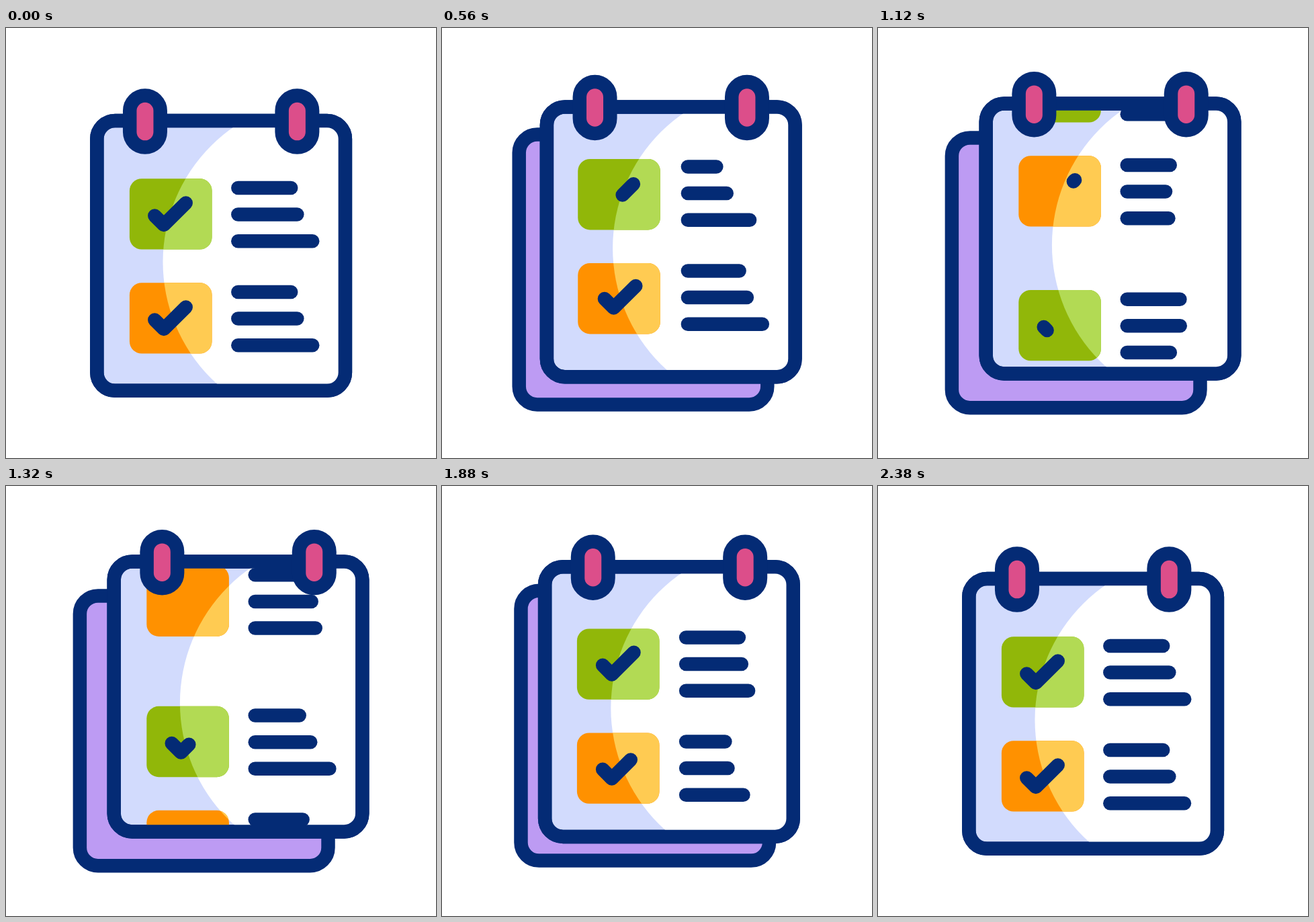
Recreate the animation shown at these times as an HTML page with a canvas. Size 640 px wide and 640 px high, loop 2400 ms.

```html
<!DOCTYPE html>
<html lang="en">
<head>
<meta charset="utf-8">
<title>Checklist pad</title>
<style>
  html, body { margin: 0; height: 100%; overflow: hidden; background: #fff; }
  canvas { display: block; width: 100vw; height: 100vh; }
</style>
</head>
<body>
<canvas id="stage" width="640" height="640"></canvas>
<script>
const ctx = document.getElementById('stage').getContext('2d');
const LOOP = 2400, SHIFT = 25.4, ROW = 155;
const NAVY = '#042b75', SHADE = '#d2dbfd', PURPLE = '#bd9bf3', PINK = '#dc4e8a';
const GREEN = ['#91b709', '#b2da54'], ORANGE = ['#ff9100', '#ffcb52'];
const CHECK = [[221.3, 279.4], [234.9, 293], [267.7, 260.4]];
const LINE_ENDS = [424.2, 433.3, 456.2];

// row: slot on the page, dip: first line's shrink start, depth: shrink amount,
// grow: first line's entry, check: start of the check's erase or draw
const items = [
  { row: 0, color: GREEN, dip: 200, depth: .475, check: 200, leaving: true },
  { row: 1, color: ORANGE, dip: 500, depth: .447, check: 600, leaving: true },
  { row: 0, color: GREEN, grow: 700, dip: 1100, depth: .283, check: 1000 },
  { row: 1, color: ORANGE, grow: 1000, dip: 1400, depth: .293, check: 1400 }
];

const linear = (t, start, length) => Math.min(1, Math.max(0, (t - start) / length));
const smooth = (t, start, length) => {
  const x = linear(t, start, length);
  return x * x * (3 - 2 * x);
};
const pulse = (ease, t, start, length, back) => ease(t, start, length) - ease(t, back, length);

function rounded(x, y, w, h, r) {
  ctx.beginPath();
  ctx.roundRect(x, y, w, h, r);
}

function panel(x, y, w, h, r, fill) {
  rounded(x, y, w, h, r);
  if (fill) {
    ctx.fillStyle = fill;
    ctx.fill();
  }
  ctx.stroke();
}

const page = fill => panel(135.3, 138, 369.6, 401.8, 27, fill);

// Strokes the part of a polyline between fractions a and b
function trim(points, a, b) {
  if (b - a < .001) return;
  let length = 0;
  ctx.beginPath();
  points.forEach(([x, y], i) => {
    ctx.lineTo(x, y);
    if (i) length += Math.hypot(x - points[i - 1][0], y - points[i - 1][1]);
  });
  ctx.setLineDash([length * (b - a), 999]);
  ctx.lineDashOffset = -length * a;
  ctx.stroke();
  ctx.setLineDash([]);
}

function at(x, y, draw) {
  ctx.save();
  ctx.translate(x, y);
  draw();
  ctx.restore();
}

function lightArea() {
  ctx.beginPath();
  ctx.arc(478, 348.3, 244.5, 0, 7);
}

function drawItem(item, t, lift) {
  const { row, color, leaving } = item;
  const scroll = smooth(t, 400, 1600);
  const y = row * ROW + (leaving ? -384 * scroll : 333 * (1 - scroll));

  // Boxes trail slightly behind the page
  const even = SHIFT * pulse(linear, t, 200, 500, 1700);
  const lag = k => even + k * (lift - even) - lift;

  const boxLag = lag(leaving ? 0 : .5);
  const box = () => rounded(183.9 + boxLag, 224.2 + y - boxLag, 122.6, 105.4, 18);
  box();
  ctx.fillStyle = color[0];
  ctx.fill();
  ctx.save();
  lightArea();
  ctx.clip();
  box();
  ctx.fillStyle = color[1];
  ctx.fill();
  ctx.restore();

  const checkLag = leaving && row === 0 ? lag(-.5) : 0;
  const drawn = smooth(t, item.check, 600);
  at(checkLag, y - checkLag, () => trim(CHECK, leaving ? drawn : 0, leaving ? 1 : drawn));

  at(0, y, () => LINE_ENDS.forEach((end, i) => {
    const delay = i * 100, dip = item.dip + delay;
    const grown = leaving ? 1 : smooth(t, item.grow + delay, 400);
    const size = grown - item.depth * pulse(smooth, t, dip, 400, dip + 400);
    const ly = 238 + i * 39.6;
    trim([[345.3, ly], [end, ly]], 0, size);
  }));
}

function draw(t) {
  const lift = SHIFT * pulse(smooth, t, 200, 500, 1700);
  ctx.fillStyle = '#fff';
  ctx.fillRect(0, 0, 640, 640);
  ctx.strokeStyle = NAVY;
  ctx.lineWidth = 20.5;
  ctx.lineCap = ctx.lineJoin = 'round';

  if (lift > 0) at(-lift, lift, () => page(PURPLE));

  at(lift, -lift, () => {
    page(SHADE);
    ctx.save();
    rounded(135.3, 138, 369.6, 401.8, 27);
    ctx.clip();
    lightArea();
    ctx.fillStyle = '#fff';
    ctx.fill();
    items.forEach(item => drawItem(item, t, lift));
    ctx.restore();
    page();
    for (const x of [184.2, 410.6]) panel(x, 100.6, 45.5, 77, 22.75, PINK);
  });
}

function tick() {
  draw(performance.now() % LOOP);
  requestAnimationFrame(tick);
}
tick();
</script>
</body>
</html>
```
